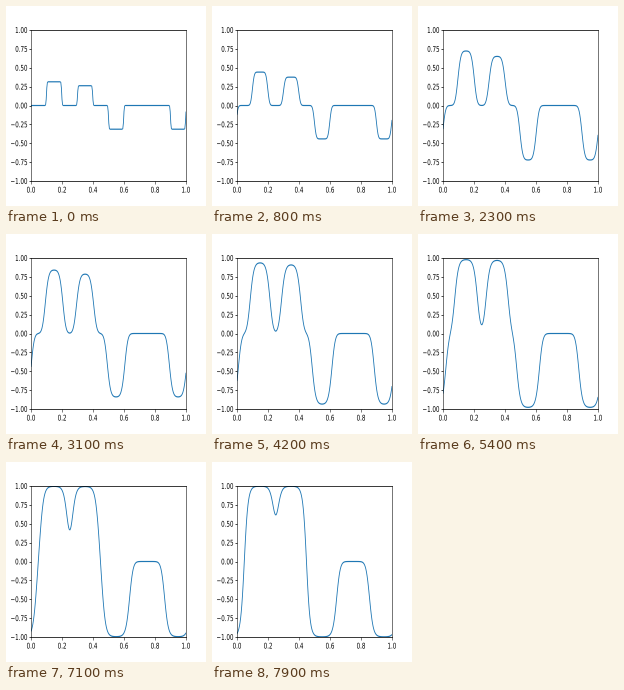
These frames come from a looping animation (200x200 px, 8000 ms). A matplotlib script:

```python
import numpy as np
import matplotlib.pyplot as plt
from matplotlib.animation import FuncAnimation
from matplotlib.patches import PathPatch, Polygon
from matplotlib.textpath import TextPath
from matplotlib.transforms import Affine2D

FRAMES, INTERVAL = 80, 100
STAGE = 200
PAGE_W, PAGE_H = 360, 252          # 5 x 3.5 in page, in points, squeezed onto the stage
LEFT, RIGHT, BOTTOM, TOP = 0.125, 0.9, 0.125, 0.88
SX, SY = STAGE / PAGE_W, STAGE / PAGE_H

# Allen-Cahn equation u_t = EPS^2 u_xx + u - u^3 on a periodic grid
N, EPS, DT, SUBSTEPS = 256, 0.01, 0.05, 10


def react(u, t):
    """Exact flow of u' = u - u^3."""
    g = np.exp(t)
    return u * g / np.sqrt(1 + u**2 * (g**2 - 1))


def solve():
    x = np.linspace(0, 1, N)
    u = np.zeros(N)
    for start, level in ((0.1, 0.3), (0.3, 0.25), (0.5, -0.3), (0.9, -0.3)):
        u[(x >= start) & (x < start + 0.1 - 1e-9)] = level
    h = DT / SUBSTEPS
    k = 2 * np.pi * np.fft.rfftfreq(N, x[1])
    decay = np.exp(-(EPS * k) ** 2 * h)
    states = []
    for _ in range(FRAMES):
        for _ in range(SUBSTEPS):
            u = react(u, h / 2)
            u = np.fft.irfft(decay * np.fft.rfft(u), N)
            u = react(u, h / 2)
        states.append(u)
    return x, states


def to_page(x, u):
    px = PAGE_W * (LEFT + (RIGHT - LEFT) * np.asarray(x))
    py = PAGE_H * (BOTTOM + (TOP - BOTTOM) * (np.asarray(u) + 1) / 2)
    return px, py


def stroke(x, u, width=1.5):
    """Outline of the curve's pen stroke in page points."""
    px, py = to_page(x, u)
    dx, dy = np.gradient(px), np.gradient(py)
    s = width / 2 / np.hypot(dx, dy)
    nx, ny = -dy * s, dx * s
    upper = np.column_stack([px + nx, py + ny])
    lower = np.column_stack([px - nx, py - ny])
    return np.vstack([upper, lower[::-1]])


fig = plt.figure(figsize=(STAGE / 100, STAGE / 100), dpi=100, facecolor="white")
ax = fig.add_axes([LEFT, BOTTOM, RIGHT - LEFT, TOP - BOTTOM])
page = Affine2D().scale(1 / PAGE_W, 1 / PAGE_H) + fig.transFigure
PX = 72 / 100                      # one stage pixel in points


def label(text, x, y, ha):
    path = TextPath((0, 0), text, size=10, prop={"family": "DejaVu Sans"})
    box = path.get_extents()
    anchor = box.x1 if ha == "right" else (box.x0 + box.x1) / 2
    place = Affine2D().translate(x - anchor, y) + page
    fig.add_artist(PathPatch(path, facecolor="black", linewidth=0, transform=place))


xticks = np.linspace(0, 1, 6)
yticks = np.linspace(-1, 1, 9)
ax.set(xlim=(0, 1), ylim=(-1, 1), xticks=xticks, yticks=yticks)
ax.tick_params(axis="x", length=3.5 * SY * PX, width=0.9 * SX * PX, labelbottom=False)
ax.tick_params(axis="y", length=3.5 * SX * PX, width=0.9 * SY * PX, labelleft=False)
for side, spine in ax.spines.items():
    scale = SX if side in ("left", "right") else SY
    spine.set_linewidth(0.95 * scale * PX)

x0, y0 = to_page(0, -1)
for v in xticks:
    label(f"{v:.1f}", to_page(v, 0)[0], y0 - 14.6, "center")
for v in yticks:
    label(f"{v:.2f}".replace("-", "\u2212"), x0 - 7, to_page(0, v)[1] - 3.7, "right")

grid, states = solve()
curve = Polygon(stroke(grid, states[0]), closed=True, facecolor="#1f77b4",
                linewidth=0, transform=page, zorder=2)
ax.add_artist(curve)
curve.set_clip_path(ax.patch)


def update(i):
    curve.set_xy(stroke(grid, states[i]))
    return (curve,)


anim = FuncAnimation(fig, update, frames=FRAMES, interval=INTERVAL,
                     init_func=lambda: update(0), repeat=True, repeat_delay=0)
plt.show()
```
